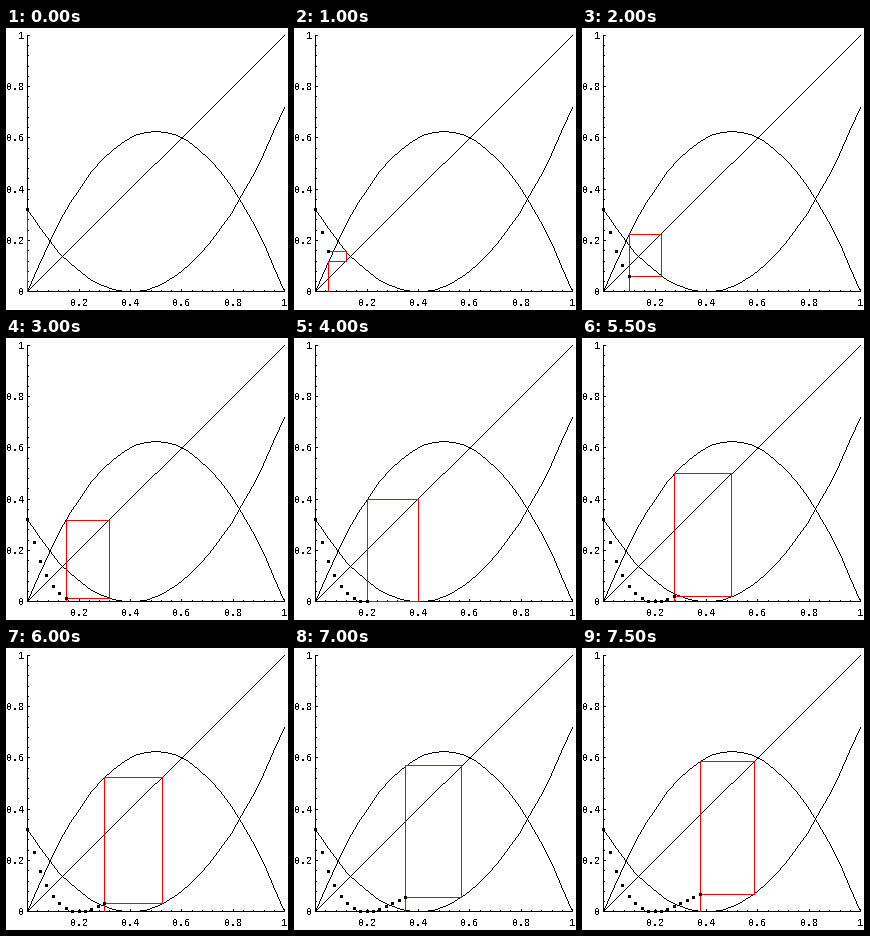
These frames come from a looping animation (282 px wide and 282 px high, 8000 ms). A matplotlib script:

```python
import numpy as np
import matplotlib.pyplot as plt
from matplotlib.animation import FuncAnimation
from matplotlib.patches import Rectangle

SIZE, DPI = 282, 94
PX = 72 / DPI
STEPS, STEP_MS, DX = 16, 500, 0.025
RED = "#ff0000"

plt.rcParams["text.antialiased"] = False
plt.rcParams["text.hinting"] = "force_autohint"


def f(x):
    return 2.5 * x * (1 - x)


def g(x):
    return 2 * (x - 0.4) ** 2


def col(x):
    return int(np.floor(21.65 + 257 * x))


def row(y):
    return int(np.floor(263.82 - 256.6 * y))


def span(x0, y0, x1, y1):
    """Bounds of the pixel block that includes both corners."""
    left, top = min(x0, x1), min(y0, y1)
    return left, top, abs(x1 - x0) + 1, abs(y1 - y0) + 1


def block(x0, y0, x1, y1, color="black", z=2):
    x, y, w, h = span(x0, y0, x1, y1)
    return ax.add_patch(Rectangle((x, y), w, h, color=color, lw=0,
                                  antialiased=False, zorder=z))


def trace(ink, xs, ys):
    """Mark a polyline one pixel wide, stepping along its longer direction."""
    points = [(col(x), row(y)) for x, y in zip(xs, ys)]
    for (x0, y0), (x1, y1) in zip(points, points[1:]):
        n = max(abs(x1 - x0), abs(y1 - y0)) + 1
        px = np.floor(np.linspace(x0, x1, n) + 0.5).astype(int)
        py = np.floor(np.linspace(y0, y1, n) + 0.5).astype(int)
        ink[py, px] = 1


def label(x, y, text, ha):
    ax.text(x, y, text, ha=ha, va="baseline", family="Liberation Mono",
            fontsize=10 * PX, color="black")


fig = plt.figure(figsize=(SIZE / DPI, SIZE / DPI), dpi=DPI, facecolor="white")
ax = fig.add_axes([0, 0, 1, 1])

# the three curves
ink = np.zeros((SIZE, SIZE))
t = np.linspace(0, 1, 25)
trace(ink, [0, 1], [0, 1])
trace(ink, t, f(t))
trace(ink, t, g(t))
ax.imshow(ink, cmap="gray_r", vmin=0, vmax=1, interpolation="nearest",
          extent=(0, SIZE, SIZE, 0), aspect="auto", zorder=1)
ax.set_xlim(0, SIZE)
ax.set_ylim(SIZE, 0)
ax.axis("off")

# axes, ticks and labels
X0, Y0 = col(0), row(0)
block(X0, row(1), X0, Y0)
block(X0, Y0, col(1), Y0)
for i in range(26):
    v = i / 25
    size = 2 if i % 5 == 0 else 1
    block(col(v), Y0 - size, col(v), Y0)
    block(X0, row(v), X0 + size, row(v))
    if i % 5 == 0:
        name = f"{v:g}"
        label(18, row(v) + 4, name, "right")
        if i:
            label(col(v) + 0.5, 278, name, "center")

sides = [block(0, 0, 0, 0, RED, 3) for _ in range(4)]

dots = []
for k in range(STEPS):
    x = k * DX
    cx, cy = col(x), row(g(f(x)))
    dots.append(block(cx - 1, cy - 1, cx + 1, cy + 1, z=4))


def draw(k):
    x = k * DX
    xa, xb = col(x), col(f(x))
    ya, yb = row(f(x)), row(g(f(x)))
    path = [(xa, Y0), (xa, ya), (xb, ya), (xb, yb), (xa, yb)]
    for side, a, b in zip(sides, path, path[1:]):
        side.set_bounds(*span(*a, *b))
    for i, dot in enumerate(dots):
        dot.set_visible(i <= k)
    return [*sides, *dots]


anim = FuncAnimation(fig, draw, frames=STEPS, interval=STEP_MS,
                     repeat=True, repeat_delay=0, blit=False)
plt.show()
```
